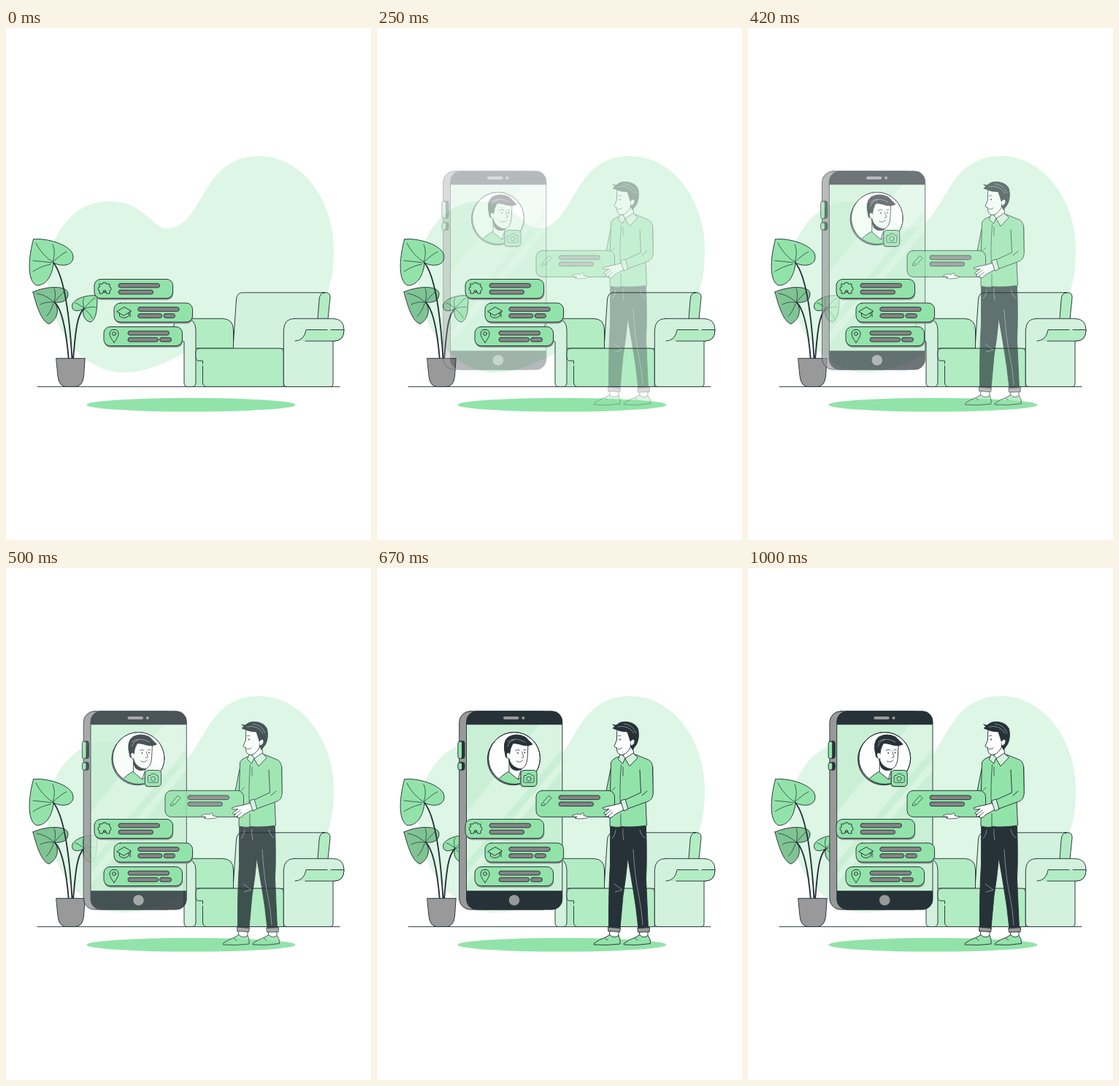
An HTML page that plays this animation: 500x700 px, repeating every 1.04 s.

```html
<!DOCTYPE html>
<html lang="en">
<head>
<meta charset="utf-8">
<title>Profile setup</title>
<style>
  html, body { margin: 0; width: 100%; height: 100%; overflow: hidden; background: #fff; }
  svg { display: block; width: 100vw; height: 100vh; }
  .art { fill: none; stroke: #263238; stroke-width: .95; stroke-linecap: round; stroke-linejoin: round; }
  .green { fill: #92e3a9; }
  .mid { fill: #b2ecc3; }
  .pale { fill: #d3f2dd; }
  .white { fill: #fff; }
  .dark { fill: #263238; }
  .gray { fill: #999; }
  .shade { fill: #85918a; stroke: none; }
  .bars { fill: #858585; }
  .flat { stroke: none; }
  .light { stroke: #fff; stroke-width: .7; opacity: .6; }
  .thin { stroke-width: .75; }
  .stem { stroke-width: 1.9; }
</style>
</head>
<body>
<svg viewBox="0 0 500 700">
  <defs>
    <clipPath id="front"><rect x="122.5" y="195.8" width="131.3" height="271.2" rx="14"/></clipPath>
    <clipPath id="disc"><circle cx="188" cy="260" r="35.5"/></clipPath>
    <g id="pill">
      <rect class="shade" x=".6" y="2.3" width="107.5" height="26" rx="8.5"/>
      <rect class="green" width="107.5" height="26" rx="8.5"/>
    </g>
    <rect id="longBar" width="56.5" height="5.6" rx="2.8"/>
    <g id="twoBars"><use href="#longBar"/><rect y="9" width="47.5" height="5.6" rx="2.8"/></g>
  </defs>

  <g class="art">
    <path class="flat" fill="#def6e6" d="M347 175C405 175 449 235 449 303C449 330 446 346 440 363C425 400 390 403 360 405C320 407 295 414 245 444C215 460 190 471 160 471C122 471 88 440 72 407C53 365 50 317 70 283C88 250 115 236 143 237C190 238 200 274 221 274C273 271 265 175 347 175Z"/>
    <ellipse class="green flat" cx="253.5" cy="515.2" rx="143" ry="9.4"/>
    <path d="M43 490.4H457"/>

    <!-- sofa -->
    <path class="pale" d="M311 438L315.5 371Q316.500 361.800 324 361.800H437L428 398V438Z"/>
    <path class="mid" d="M434 361.800H438Q444.500 362 444 369L441 398H427L429 372Q429.500 362 436 361.800Z"/>
    <path class="mid" d="M252 397.300H297Q311.500 398 311.500 413V438H260Z"/>
    <path class="mid flat" d="M258 440H280V490H256Z"/>
    <path class="pale" d="M229 408Q232 397.300 246 397.300Q260 398 260 413V484Q260 490.400 255 490.400H249Q244 490.400 244 485V429L241 428Z"/>
    <path class="mid flat" d="M260 440H380V490H265Z"/>
    <path class="mid" d="M265 438H375Q380.300 438 380.300 444V490.400H275Q269.500 490.400 269.500 484V462M269.500 459V455H264Q260 455 260 449V444Q260 438 265 438"/>
    <path class="pale" d="M395 397.300H448Q463 398 463 412.500Q463 428 449 428H448V486Q448 490.400 444 490.400H385Q380.300 490.400 380.300 485V413Q381 397.300 395 397.300Z"/>
    <path class="mid flat" d="M396 428Q409 427 411 412.600H463Q463 428 449 428Z"/>
    <path d="M396 428Q409 427 411 412.600H440M445 412.600H463Q463 428 449 428H410"/>

    <!-- plant -->
    <path class="green" d="M37.500 289C52 286 92 296 92 313C92 325 77 327 65 321C64 335 57 352 42 352C27 345 32 309 37.500 289Z"/>
    <path fill="#7fc493" d="M37 361C53 353 85 351 85 363.500C85 374 75 376 67 375C73 385 71 398 59 404.500C49 402 42 381 37 361Z"/>
    <path class="green" d="M125 366C110 364 90.500 371 90.500 380.500C91 389 100 387 106.500 384C104 392 108 401 116 402C124 398 125 384 125 366Z"/>
    <g class="thin">
      <path d="M64 320C55 314 47 306 41 294M64 320C67 311 67 303 64 296M64 320C72 313 78 308 83 306M62 321C52 319 43 319 37 318M61 323C51 325 43 329 37 333"/>
      <path d="M66 375C58 368 50 364 42 363M66 375C68 367 68 361 66 356M66 375C72 368 77 363 80 360M65 375C57 374 51 376 47 378M65 377C62 385 59 391 55 394"/>
      <path d="M107 383C113 377 118 371 122 369M107 383C105 377 105 372 107 369M107 383C101 379 97 376 95 376M107 384C114 381 120 381 123 382M108 385C113 389 117 393 118 397"/>
    </g>
    <path class="stem" d="M90.500 452C88 410 82 342 65 321M85.800 452C83 420 78 386 67 375.500M92 452C95 422 96 394 106.500 384"/>
    <path class="gray" d="M69 451.700H108.200L106.500 476Q105 490.400 94.500 490.400H82.500Q72.500 490.400 71 476Z"/>
  </g>

  <g id="phone" class="art">
    <rect class="gray" x="112.700" y="195.800" width="130" height="271.200" rx="15"/>
    <rect class="dark" x="113.500" y="236.500" width="6.500" height="24" rx="3"/>
    <rect class="dark" x="113.500" y="265.500" width="6.500" height="11" rx="3"/>
    <rect class="green" x="110.900" y="237" width="5.600" height="23.500" rx="2.500"/>
    <rect class="green" x="110.900" y="266" width="5.600" height="10" rx="2.500"/>
    <g clip-path="url(#front)" class="flat">
      <rect fill="#c9f0d5" x="122" y="195" width="133" height="273"/>
      <path fill="#d9f5e2" d="M223 214H254V247L122 403V334ZM254 262V276L122 432V418Z"/>
      <path class="dark" d="M122 195H255V214.300H122ZM122 441.300H255V468H122Z"/>
    </g>
    <rect x="122.500" y="195.800" width="131.300" height="271.200" rx="14"/>
    <rect class="gray flat" x="173" y="203" width="21.500" height="4" rx="2"/>
    <circle class="gray flat" cx="200.300" cy="205" r="2"/>
    <circle class="gray flat" cx="188" cy="454.200" r="7.300"/>

    <!-- portrait -->
    <circle class="gray" cx="186.800" cy="261.300" r="35.500"/>
    <circle class="white" cx="188" cy="260" r="35.500"/>
    <g clip-path="url(#disc)">
      <path class="green" d="M164 292Q171 283 181 278L194 289L202 280L214 298H164Z"/>
      <path class="white" d="M181 260L181 279L193 289L198 274Z"/>
      <path class="white" d="M181 240Q178 252 181 264Q186 276 196 275.500Q205 273 206 260L207 241Q196 236 181 240Z"/>
      <path class="dark" d="M176 256Q171 238 180 231Q191 225 203 231Q207 235 213 241Q207 244.500 199 242Q190 239 186 240Q182 247 181.500 255Q178 254 179 259Q176 260 176 256ZM181 262Q185 274 198 275Q190 279 184 273.500Q181 269 181 262Z"/>
      <path class="white" d="M181.500 253Q176.500 251 177.500 257Q178.500 262 182 261"/>
      <path class="light" d="M179 238Q188 230 203 238M179 244Q181 236 188 235"/>
      <path class="thin" d="M189.500 249.500Q192.500 247.500 195.500 249M200.500 249L204 248.500M198.500 251L201 258.500L198 259.500M191 264Q196 267 200 262.500"/>
      <circle class="dark flat" cx="193" cy="253" r=".9"/><circle class="dark flat" cx="202.300" cy="252.500" r=".9"/>
    </g>
    <circle cx="188" cy="260" r="35.500"/>
    <rect class="shade" x="196" y="277.500" width="22" height="22" rx="4.500"/>
    <rect class="green" x="197" y="276.500" width="22" height="22" rx="4.500"/>
    <path class="thin" d="M202.500 283.500H204.500L206 281.300H210.500L212 283.500H213.500Q215 283.500 215 285V291.800Q215 293.300 213.500 293.300H202.500Q201 293.300 201 291.800V285Q201 283.500 202.500 283.500Z"/>
    <circle class="thin" cx="208" cy="288.200" r="3.100"/>
  </g>

  <g class="art">
    <use href="#pill" x="121" y="343.500"/>
    <use href="#pill" x="148" y="376"/>
    <use href="#pill" x="134" y="408.500"/>
    <g class="bars">
      <use href="#twoBars" x="154" y="349.300"/>
      <use href="#longBar" x="180.700" y="381.700"/>
      <rect x="180.700" y="390.700" width="33" height="5.600" rx="2.800"/>
      <rect x="216" y="390.700" width="15.500" height="5.600" rx="2.800"/>
      <use href="#longBar" x="167" y="414.300"/>
      <rect x="167" y="423.300" width="41.500" height="5.600" rx="2.800"/>
      <rect x="210.500" y="423.300" width="16" height="5.600" rx="2.800"/>
    </g>
    <path d="M128 350H132Q131.500 348 135 348Q138 348 137.500 350H142V354Q144 354 144 356.500Q144 359 142 359V363H137.500Q138 360 135 360Q132 360 132.500 363H128V359Q126 359 126 356.500Q126 354 128 354Z"/>
    <circle class="thin" cx="135" cy="360" r="1.700"/>
    <path d="M152 387.500L162 381.500L171.500 387L161.500 393ZM155.500 390V394Q162 399 168 393.500V389.500M170 388V395"/>
    <path d="M148 430Q142 422.500 142 418Q142.500 412.300 148 412.300Q153.700 412.300 154 418Q154 422.500 148 430Z"/>
    <circle cx="148" cy="418" r="2.400"/>
  </g>

  <g id="man" class="art">
    <!-- shoes and legs -->
    <path class="white" d="M319 496L318 504L331 506V496ZM360 496L359 504L371 506V496Z"/>
    <path class="green" d="M297.500 513Q304 508 312 505.500L319 501.500Q324 507 331 502.500Q334 508 333 514Q315 516.500 297.500 515Z"/>
    <path class="green" d="M338.500 513Q345 508 353 505.500L360 501.500Q365 507 371 502.500Q375.500 508 374.500 513.500Q356 516.500 338.500 515Z"/>
    <path class="thin" d="M312 506L316 509M353 506L357 509"/>
    <path class="dark" d="M320 353H368.500Q370 395 368.500 425Q370 460 371.500 493H358Q355 462 350.500 437L343.500 396Q341 425 337 448L333 492H317.500Q317 445 319.500 405Z"/>
    <path class="gray" d="M317 491L333.500 492.500L332.500 497.500L317 496.500ZM357 492.500L373.500 491.500L373 497.500L358 498Z"/>
    <path class="light" d="M351 385Q353 420 358 445Q363 468 364 488M325 432L336 440L326 443M360 358Q362 366 367 369M327 358Q326 366 322 370M338 372Q336 363 337 357"/>

    <!-- body -->
    <path class="green" d="M320 275L314 305H322V275Z"/>
    <path class="green" d="M331 258Q322 261 320.500 266L319.500 304L319 353Q330 355.500 335 353.500Q350 355 369.500 352L368 318L378 308L377.500 271Q376 263 370 261.500L354 255Z"/>
    <path class="white" d="M338 247L337 258L341 262L352 255L350 243Z"/>
    <path class="pale" d="M333.500 253.500L330.500 261.500L336.500 267.500L340 260ZM351 253.500L357.500 259L346 271L340 261Z"/>
    <path class="thin" d="M334.500 269Q332 300 333.500 328M334 336V353M337 272V284M326 300L322 304"/>

    <!-- head -->
    <path class="white" d="M329 221Q328 230 328.500 235L325 243.500Q325.500 245.500 328.500 245.500Q328 254 334 255.500Q341 256 347 246L349 225Z"/>
    <path class="dark" d="M323 214Q327 216 329 214Q334 209.500 343 210.500Q354 212 357.500 220Q360 232 355.500 241L350 248.500Q347 245 347.500 238Q345 230 343 224Q333 224 323 219L326 217Z"/>
    <path class="white" d="M347 237Q351 232 353 236Q353 242 348 243"/>
    <path class="light" d="M330 217Q345 214 352 226M338 213Q351 214 355 226"/>
    <path class="thin" d="M330 229.500L334 229M330 247.500Q333 248.500 336 246"/>
    <circle class="dark flat" cx="333" cy="234.500" r="1"/>

    <!-- held card -->
    <rect class="green" x="218" y="304.300" width="107.500" height="36" rx="8.500"/>
    <use class="bars" href="#twoBars" x="249" y="311"/>
    <path class="thin" d="M227.500 320L235.500 311L239 314.500L231 323.500ZM226 321.500L225.500 325L229.500 324.500"/>
    <path class="white thin" d="M268 338Q274 335 279 337L282 334.500Q284 336 283 338.500L290 340.300Q288 342.500 283 342.500Q276 343.500 271 342L274 340.300L269 340Z"/>

    <!-- near arm -->
    <path class="white" d="M336 321L325 324Q317 325 309 328Q309 331 318 329.500L310.500 335Q311 337 314 336.500L312.500 339.500Q314 341 317 339L318 342Q322 342 326 337L341 329Z"/>
    <path class="thin" d="M314 336.500L321 331M317 339L323 334"/>
    <path class="green flat" d="M360 277L362 306L341 316L344 329L368 320L376 316Q379 312 378 300L377 270Z"/>
    <path d="M360 276L361.500 307L341 316.500M344 329L370 319.500Q378 317 378.200 308L377.800 272M363 311L370 305"/>
    <path class="pale" d="M334 318L340 316L344 329.500L338.500 332Z"/>
  </g>
</svg>
<script>
  const phone = document.getElementById('phone');
  const man = document.getElementById('man');
  const LOOP = 1040, STEP = 1000 / 24;

  // Phone's right edge: [step, x]
  const drift = [[0, 220], [2, 223.2], [6, 232], [8, 237.5], [10, 242.8], [12, 247.5], [14, 251.4],
                 [16, 254], [18, 255.4], [20, 255.6], [22, 254.7], [24, 253.2], [26, 251]];

  function edgeAt(k) {
    const i = drift.findIndex(p => p[0] > k);
    const [k0, x0] = drift[i - 1], [k1, x1] = drift[i];
    return x0 + (x1 - x0) * (k - k0) / (k1 - k0);
  }

  function draw(now) {
    const k = Math.floor((now % LOOP + 5) / STEP);
    const fade = Math.min(1, Math.max(0, (k - 1.9) / 12.1));
    phone.setAttribute('transform', `translate(${edgeAt(k) - 254} 0)`);
    phone.setAttribute('opacity', fade);
    man.setAttribute('opacity', fade);
  }

  let start;
  function tick(now) {
    start ??= now;
    draw(now - start);
    requestAnimationFrame(tick);
  }
  draw(0);
  requestAnimationFrame(tick);
</script>
</body>
</html>
```
